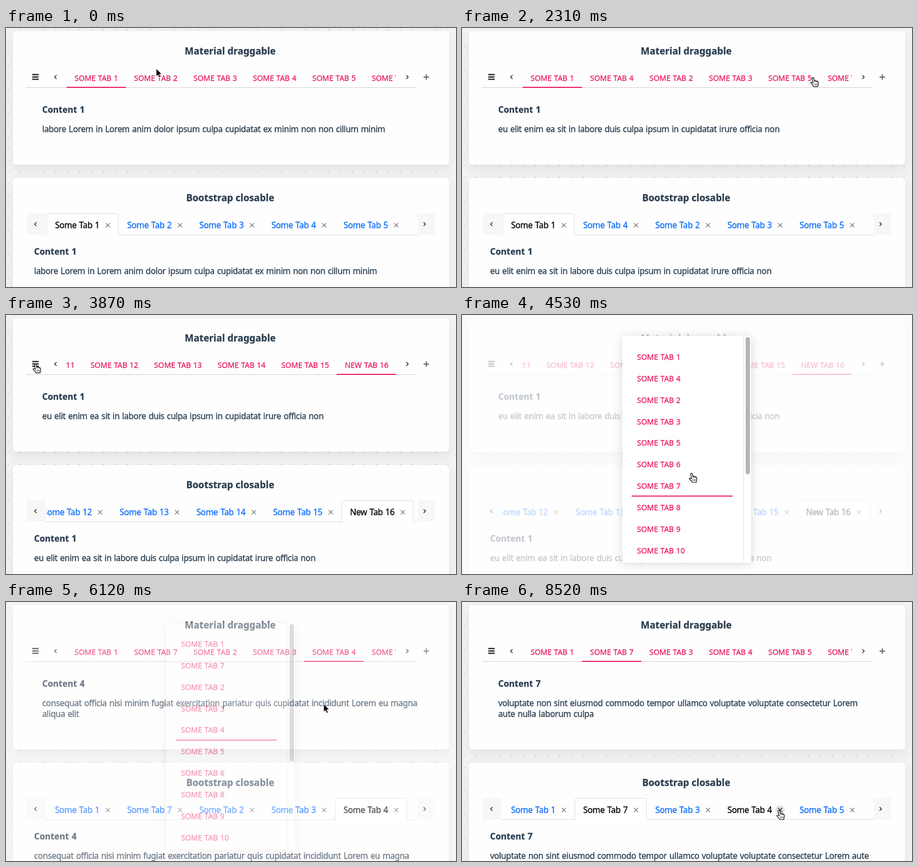
An HTML page that plays this animation: 833x480 px, repeating every 8550 ms.

```html
<!DOCTYPE html>
<html lang="en">
<head>
<meta charset="utf-8">
<title>Draggable tabs</title>
<style>
  html, body { margin: 0; width: 100%; height: 100%; overflow: hidden; background: #f3f3f3; }
  svg { display: block; width: 833px; height: 480px; font-family: "Noto Sans", "Open Sans", sans-serif; }
  text { color: #2c3e50; fill: currentColor; stroke: currentColor; stroke-width: .3; white-space: pre; }
  .title { font: 700 17.6px "Noto Sans", "Open Sans", sans-serif; text-anchor: middle; }
  .head { font-weight: 700; font-size: 16px; word-spacing: 1px; }
  .body, .tab { font-size: 15.6px; letter-spacing: -.38px; word-spacing: 1px; }
  .pink { font-size: 14px; word-spacing: .6px; color: #e91e63; }
  .ink { fill: #e91e63; }
  .icon { fill: none; stroke: #333; stroke-width: 1.6; }
  .card { fill: #fefefe; filter: drop-shadow(0 8px 10px rgba(0, 0, 0, .07)); }
</style>
</head>
<body>
<script>
const LOOP = 8550, SWAP = 90;

// The page height, and with it the dotted backdrop, depends on the text shown.
const TEXTS = {
  first: { dots: 2, lines: ['labore Lorem in Lorem anim dolor ipsum culpa cupidatat ex minim non non cillum minim'] },
  four: { dots: 10, lines: ['consequat officia nisi minim fugiat exercitation pariatur quis cupidatat incididunt Lorem eu magna', 'aliqua elit'] },
  again: { dots: 12, lines: ['eu elit enim ea sit in labore duis culpa ipsum in cupidatat irure officia non'] },
  seven: { dots: 20, lines: ['voluptate non sint eiusmod commodo tempor ullamco voluptate voluptate consectetur Lorem', 'aute nulla laborum culpa'] }
};

// Each step changes part of the state; move is [tab, new index].
const STEPS = [
  { t: 0, active: 1, row: 1, num: 1, text: 'first' },
  { t: 800, active: 4, row: 4, num: 4, text: 'four' },
  { t: 1450, move: [4, 2] },
  { t: 1600, move: [4, 1] },
  { t: 2050, active: 1, row: 1, num: 1, text: 'again' },
  { t: 3300, add: 16, active: 16, row: 16 },
  { t: 4480, row: 7 },
  { t: 4600, move: [7, 5] },
  { t: 4690, move: [7, 4] },
  { t: 4780, move: [7, 3] },
  { t: 4870, move: [7, 2] },
  { t: 4960, move: [7, 1] },
  { t: 5050, active: 7, num: 7, text: 'seven' },
  { t: 5250, active: 4, row: 4, num: 4, text: 'four' },
  { t: 5400, move: [4, 3] },
  { t: 5520, move: [4, 4] },
  { t: 6700, active: 7, row: 7, num: 7, text: 'seven' },
  { t: 7750, close: 2 }
];

const CURSOR = [
  [0, 278, 75], [650, 495, 88], [850, 497, 97], [1200, 470, 98], [1350, 405, 97],
  [1650, 300, 97], [1800, 280, 97], [2050, 165, 95], [2400, 743, 91], [2800, 743, 91],
  [3050, 783, 92], [3350, 783, 92], [3800, 54, 90], [3980, 55, 91], [4400, 425, 310],
  [4530, 425, 293], [5000, 425, 118], [5150, 425, 155], [5250, 425, 157], [5600, 425, 240],
  [5900, 588, 189], [6250, 588, 189], [6600, 277, 92], [6800, 277, 94], [7300, 385, 361],
  [7410, 391, 371], [7650, 454, 385], [7850, 455, 385], [8300, 587, 386]
];
const SCROLL = [[0, 0, 0], [2400, 0, 0], [2900, 727, 611], [3300, 727, 611], [3700, 1196, 1508.7], [5050, 1196, 1508.7], [5300, 0, 0]];
const MODAL = [[0, 0], [3950, 0], [4150, 1], [6020, 1], [6200, 0]];

const ease = p => p * p * (3 - 2 * p);
const clamp = p => Math.max(0, Math.min(1, p));
const mix = (a, b, p) => a + (b - a) * p;

function track(keys, t, curve = ease) {
  const i = keys.findLastIndex(k => k[0] <= t);
  const a = keys[i], b = keys[i + 1] || a;
  const p = b === a ? 0 : curve((t - a[0]) / (b[0] - a[0]));
  return a.slice(1).map((v, n) => mix(v, b[n + 1], p));
}

let last = { order: Array.from({ length: 15 }, (_, i) => i + 1) };
const states = STEPS.map(s => {
  let order = last.order.slice();
  if (s.move) {
    order = order.filter(id => id !== s.move[0]);
    order.splice(s.move[1], 0, s.move[0]);
  }
  if (s.add) order.push(s.add);
  if (s.close) order = order.filter(id => id !== s.close);
  return last = { ...last, ...s, order };
});

const wide = id => id > 9 && id < 16;
const topWidth = id => wide(id) ? 117.7 : 110;
const lowWidth = id => wide(id) ? 142.2 : 133.5;
const label = id => (id === 16 ? 'New' : 'Some') + ' Tab ' + id;

function places(order, size) {
  const out = {};
  let at = 0;
  for (const id of order) { out[id] = at; at += size(id); }
  return out;
}

// Positions at a given time, sliding after each change of order.
function layout(t, size) {
  const i = states.findLastIndex(s => s.t <= t);
  const now = places(states[i].order, size);
  if (i === 0) return now;
  const old = places(states[i - 1].order, size);
  const p = clamp((t - states[i].t) / SWAP);
  for (const id in now) if (id in old) now[id] = mix(old[id], now[id], p);
  return now;
}

function el(tag, attrs, parent, text) {
  const node = document.createElementNS('http://www.w3.org/2000/svg', tag);
  set(node, attrs);
  if (text) node.textContent = text;
  if (parent) parent.append(node);
  return node;
}
function set(node, attrs) {
  for (const k in attrs) node.setAttribute(k, attrs[k]);
}
function write(node, text) {
  if (node.textContent !== text) node.textContent = text;
}
const rect = (parent, x, y, width, height, more) => el('rect', { x, y, width, height, ...more }, parent);
const words = (parent, cls, x, y, text) => el('text', { class: cls, x, y }, parent, text);
const move = (node, x, y) => node.setAttribute('transform', `translate(${x} ${y})`);
const show = (node, on) => node.setAttribute('display', on ? 'inline' : 'none');
const chevron = (parent, x, y, dir) =>
  el('path', { class: 'icon', d: `M${x - 2 * dir} ${y - 3.5}l${3.5 * dir} 3.5l${-3.5 * dir} 3.5` }, parent);

const svg = el('svg', { viewBox: '0 0 833 480' }, document.body);
const defs = el('defs', {}, svg);
const dots = el('pattern', { id: 'dots', width: 22, height: 22, patternUnits: 'userSpaceOnUse' }, defs);
el('circle', { cx: 4, cy: 1, r: .7, fill: '#888' }, dots);
function clip(id, x, y, w, h) {
  rect(el('clipPath', { id }, defs), x, y, w, h);
}
clip('topClip', 112, 70, 610, 45);
clip('lowClip', 75, 340, 682, 48);
clip('listClip', 297, 39, 224, 420);

rect(svg, 0, 0, 833, 480, { fill: '#f3f3f3' });
rect(svg, 0, 0, 833, 480, { fill: 'url(#dots)' });

// Upper card
const topCard = rect(svg, 13, 6, 807, 247, { class: 'card', rx: 6 });
words(svg, 'title', 415, 48.5, 'Material draggable');
rect(svg, 37, 110, 724, 1, { fill: '#d0d0d0' });
for (let i = 0; i < 3; i++) rect(svg, 48.5, 85 + i * 4.4, 12, 2.5, { fill: '#333', rx: .6 });
chevron(svg, 91.5, 91, -1);
chevron(svg, 743, 91, 1);
const plus = el('path', { d: 'M773 91h10M778 86v10', 'stroke-width': 1.9 }, svg);
const topStrip = el('g', {}, el('g', { 'clip-path': 'url(#topClip)' }, svg));
const topInk = rect(topStrip, 0, 109, 110, 2, { class: 'ink' });
const topHead = words(svg, 'head', 67, 157);
const topLines = [193, 212.5].map(y => words(svg, 'body', 67, y));

// Lower card
const low = el('g', {}, svg);
rect(low, 13, 278, 807, 260, { class: 'card', rx: 6 });
words(low, 'title', 415, 320.5, 'Bootstrap closable');
rect(low, 38, 343, 35, 40, { fill: '#f7f7f7' });
rect(low, 762, 343, 32, 40, { fill: '#f7f7f7' });
chevron(low, 54.5, 363.5, -1);
chevron(low, 775, 363.5, 1);
rect(low, 72, 383, 690, 1, { fill: '#d9dcdf' });
const lowStrip = el('g', {}, el('g', { 'clip-path': 'url(#lowClip)' }, low));
const lowHead = words(low, 'head', 52, 420);
const lowLine = words(low, 'body', 52, 456);

// Tab list dialog
const modal = el('g', {}, svg);
rect(modal, 0, 0, 833, 480, { fill: '#fff', opacity: .72 });
rect(modal, 297, 39, 238, 420, { fill: '#fff', rx: 3, style: 'filter:drop-shadow(0 2px 9px rgba(0,0,0,.14))' });
rect(modal, 521, 39, 1, 420, { fill: '#e4e4e4' });
rect(modal, 525, 41, 8, 254, { fill: '#b5b5b5', rx: 4 });
const list = el('g', { 'clip-path': 'url(#listClip)' }, modal);
const listInk = rect(list, 314, 0, 187, 2, { class: 'ink' });

const tabs = Array.from({ length: 16 }, (_, i) => {
  const id = i + 1, name = label(id), end = lowWidth(id);
  const top = words(topStrip, 'pink', 15, 97.5, name.toUpperCase());
  const row = words(list, 'pink', 324, 0, name.toUpperCase());
  const box = el('g', {}, lowStrip);
  const frame = el('path', {
    d: `M.5 384V347.5q0-4 4-4H${end - 4.5}q4 0 4 4V384`, fill: '#fff', stroke: '#d9dcdf'
  }, box);
  const text = words(box, 'tab', 15.8, 371, name);
  const x = end - 20;
  const halo = el('circle', { cx: x, cy: 365.5, r: 8.5, fill: '#e3e3e3' }, box);
  const cross = el('path', { d: `M${x - 3.8} 361.7l7.6 7.6m0-7.6l-7.6 7.6`, 'stroke-width': 1.2 }, box);
  return { id, top, row, box, frame, text, halo, cross };
});

const arrow = el('path', {
  d: 'M0 0V15L3.4 11.8L5.7 17.2L8.3 16L6 10.8H10.8Z', fill: '#000', stroke: '#fff', 'stroke-width': 1
}, svg);
const hand = el('g', {}, svg);
el('path', {
  d: 'M-1.8 1.3Q-1.5 0 -.3 0Q1 0 1.3 1.5L2.2 6Q3.5 5 4.6 6.4Q6 5.6 7 7Q8.6 6.5 9.3 8.4Q10.3 11.5 9.2 14.2L8.7 17H1.2L0 14.8L-4 10.8Q-4.6 9.4 -3.3 9Q-2 8.8 .1 10.5Z',
  fill: '#fff', stroke: '#000', 'stroke-width': 1.2, 'stroke-linejoin': 'round'
}, hand);
el('path', { d: 'M2.4 6.5l.4 2.4M4.8 6.8l.3 2M7.1 7.4l.2 1.8M2.7 11.5l.3 3M5 11.3v3.2M7.2 11.3l-.2 3', fill: 'none', stroke: '#000', 'stroke-width': .8 }, hand);

const stateAt = t => states.findLast(s => s.t <= t);
const shift = t => TEXTS[stateAt(t).text].lines.length > 1 ? 20 : 0;
const inside = (x, y, x0, y0, x1, y1) => x >= x0 && x <= x1 && y >= y0 && y <= y1;

// Which lower tab the pointer is on, and whether it is on the close mark.
function lowHit(t) {
  if (t < 0 || track(MODAL, t, p => p)[0] > 0) return {};
  const [x, y] = track(CURSOR, t), dy = shift(t);
  if (!inside(x, y, 75, 342 + dy, 759, 383 + dy)) return {};
  const left = layout(t, lowWidth), at = x - 75 + track(SCROLL, t)[1];
  for (const id of stateAt(t).order) {
    const d = at - left[id], w = lowWidth(id);
    if (d >= 0 && d < w) return { id, close: Math.abs(d - w + 20) < 9 };
  }
  return {};
}

function draw(t) {
  const s = stateAt(t), { lines, dots: offset } = TEXTS[s.text], dy = shift(t);
  const [x, y] = track(CURSOR, t), [topScroll, lowScroll] = track(SCROLL, t);
  const [open] = track(MODAL, t, p => p);
  const tops = layout(t, topWidth), lows = layout(t, lowWidth), rows = layout(t, () => 39.85);
  const hit = lowHit(t);
  const recent = [0, 1, 2, 3, 4, 5].map(k => lowHit(t - k * 25).id);

  set(dots, { patternTransform: `translate(0 ${offset})` });
  set(topCard, { height: 247 + dy });
  move(low, 0, dy);
  move(topStrip, 112 - topScroll, 0);
  move(lowStrip, 75 - lowScroll, 0);
  write(topHead, 'Content ' + s.num);
  write(lowHead, 'Content ' + s.num);
  topLines.forEach((line, i) => write(line, lines[i] || ''));
  write(lowLine, lines[0] + (s.text === 'seven' ? ' aute' : ''));

  for (const tab of tabs) {
    const on = s.order.includes(tab.id), active = tab.id === s.active;
    for (const node of [tab.top, tab.row, tab.box]) show(node, on);
    if (!on) continue;
    set(tab.top, { x: tops[tab.id] + 15 });
    set(tab.row, { y: 83 + rows[tab.id] });
    move(tab.box, lows[tab.id], 0);
    show(tab.frame, active);
    const warm = active ? 1 : recent.filter(id => id === tab.id).length / recent.length;
    tab.text.style.color = `rgb(${[13, 110, 253].map(c => Math.round(c * (1 - warm)))})`;
    const close = hit.close && hit.id === tab.id;
    show(tab.halo, close);
    set(tab.cross, { stroke: close ? '#000' : '#666' });
  }
  set(topInk, { x: tops[s.active], width: topWidth(s.active) });
  set(listInk, { y: 95.5 + rows[s.row] });

  const overPlus = inside(x, y, 768, 80, 790, 102);
  set(plus, { stroke: overPlus && !open ? '#000' : '#666' });
  set(modal, { opacity: open });
  show(modal, open > 0);

  const point = open > 0
    ? inside(x, y, 314, 55, 501, 458)
    : overPlus || hit.id || inside(x, y, 112, 77, 722, 111) ||
      [54, 91, 743].some(c => inside(x, y, c - 12, 79, c + 12, 103));
  show(hand, point);
  show(arrow, !point);
  move(point ? hand : arrow, x, y);
}

const start = performance.now();
function tick() {
  draw((performance.now() - start) % LOOP);
  requestAnimationFrame(tick);
}
tick();
</script>
</body>
</html>
```
